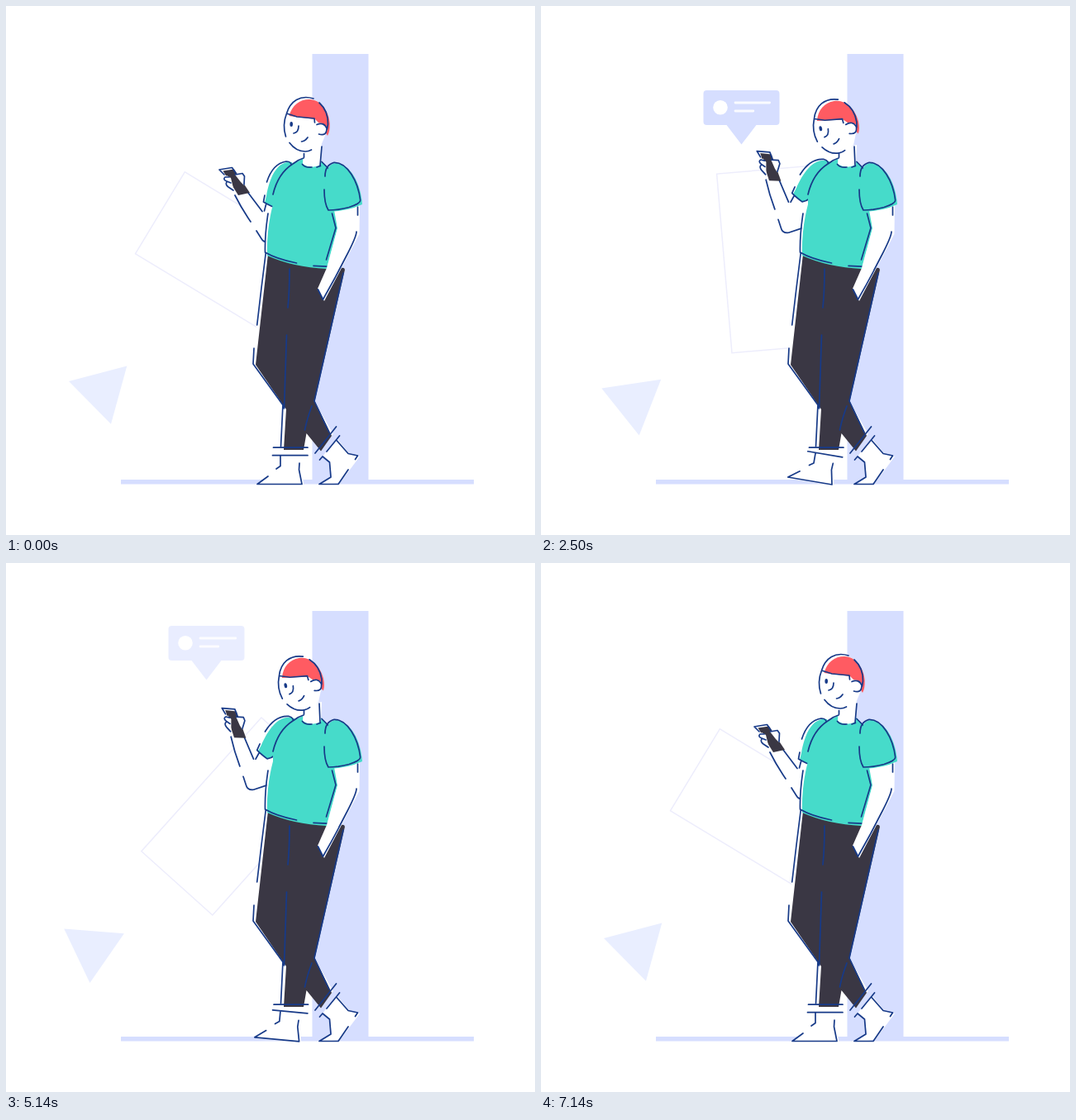
Animation of 640 by 640 pixels, one loop 7210 ms. Source, as an HTML page:

```html
<!DOCTYPE html>
<html lang="en">
<head>
<meta charset="utf-8">
<title>Person with a phone</title>
<style>
  html, body { margin: 0; width: 100%; height: 100%; overflow: hidden; background: #fff; }
  svg { display: block; width: 100%; height: 100%; }
  .line { fill: none; stroke: #173a88; stroke-width: 1.7; stroke-linecap: round; stroke-linejoin: round; }
  .pale { fill: #d6deff; }
  .teal { fill: #46dbca; }
  .dark { fill: #3a3744; }
  .red { fill: #ff5b62; }
  .white { fill: #fff; }
  .text { stroke: #fff; stroke-width: 2.8; stroke-linecap: round; stroke-opacity: .88; }
</style>
</head>
<body>
<svg viewBox="0 0 640 640">
  <rect id="frame" x="170.7" y="248.7" width="217.4" height="115.6" fill="none" stroke="#ededfc" stroke-width="1.5"/>
  <path class="pale" d="M370.5 58H438.5V573H566V578.5H139V573H370.5Z"/>
  <path id="triangle" fill="#e9eeff" d="M76 454L146.3 435.5L127 505.8Z"/>

  <g id="bubble">
    <path class="pale" d="M200.5 102H284.5Q288.5 102 288.5 106V140Q288.5 144 284.5 144H260.5L242.5 167.5L224.5 144H200.5Q196.5 144 196.5 140V106Q196.5 102 200.5 102Z"/>
    <circle id="avatar" class="white" cx="217" cy="122.8" r="8.8"/>
    <path id="text1" class="text"/>
    <path id="text2" class="text"/>
  </g>

  <g id="arm">
    <path class="white" d="M268 204L288 203L290 218L311 249L316 238L336 240L334 276L319 285Q312 287 309 282L296 261L277 229L264 211Z"/>
    <path class="teal" d="M346 189C328 187 319 207 315 230L313 238L326 244.5L335 238L352 205Z"/>
    <path class="line" d="M345.500 195Q346 188 339 188C326 190 319 202 315.500 213M313 229L311.500 237Q316 240 326 244.300Q331 242 334 238M314.600 240L312.500 248M293 226L310 248.500M277 229Q285 245 296 261M303 272L309 281.500Q312 287 319 284.500L334 275"/>
    <path class="white" d="M258 198L274 195.500L279 203L263 204Z"/>
    <path class="dark" d="M262.500 199.500L276 197.500L295 226L281 229Z"/>
    <path class="white" d="M277 204L287 202.500L289 206L288 217L284 213Z"/>
    <path class="white" d="M267 205L263 209L267 213L266 216L276 224L272 208Z"/>
    <path class="line" d="M264 204L258 198L273.500 195.500L278 202M277.500 204L286 202.500L288.500 206L288 216M270 207L265 207Q262 210 267 212L272 214M267 213Q265 216 269 219L275 223"/>
  </g>

  <g id="foot">
    <path class="white" d="M332 543H357L357 560L360.500 579.500H305L318 568L332 558Z"/>
    <path class="line" d="M322.500 543.700H365M332 544V556.500L327 560M317 569L304 578.500H358L354.500 561L355 553"/>
  </g>
  <path class="white" d="M314 297L300 414L299 433L336 485L332.500 534H362L364 518L376 532L396 518L373 478L410 318Z"/>
  <path class="dark" d="M317 300L390 315L409 317L410 319L373.500 478L394 520L381 538.500L363.500 517L360 537H336L339 488L302 434Z"/>
  <path class="line" d="M315 293Q309 340 303.700 386M300 414L299 433L337 485.500M335 482L332.500 533M343 318Q343 345 341 365M339.500 398Q338 445 336.500 487M408 323L373 478L391 516M370 484Q364 500 361.500 513"/>
  <path id="cuff" class="line" d="M323.500 534.200H365"/>

  <path class="white" d="M386 541L400 523L415 541L428 545L404 577L381 579.500L394 570L392 553L383 545Z"/>
  <path class="line" d="M374 541L399.500 509M388 539L403.500 520M379.500 549L383 545L391.500 552L393 570L379 578.500H402L414 561M399.500 525L414 541.500L425.500 544L422.500 548.500"/>

  <path class="white" d="M317 251L313 298L325 303L325 240Z"/>
  <path class="teal" d="M323 229C327 210 336 197 347 191L359 185L381 187L390 196L399 250L401 269L388 318Q347 316 316 302Q315 270 323 240Z"/>
  <path class="white" d="M360 172L382 168L381 192Q369 198 359 191Z"/>
  <path class="line" d="M323 228C327 211 336 198 347 191Q353 186 360 184M360.500 178.500L360.500 183M358.500 191.500Q362 196 370 195M376 195L380.500 193.500M382 188.500L391 197.500M317 251Q313 277 313.500 298Q327 306 351.500 311M372 314.300L388 315.200"/>
  <path id="nape" class="line"/>

  <path class="white" d="M397 247L428 240L427.500 276L385 357L377 342L388 317L401 269Z"/>
  <path class="line" d="M425.500 243V253M424 273Q424 279 412 302Q399 328 383.500 355L377.500 343M394.500 251L399 268.500L387.500 307"/>
  <path class="teal" d="M387 206Q389 190 400 190C418 193 429 215 431 240Q414 248 391 249Q384 231 387 206Z"/>
  <path class="line" d="M386 206Q386 192 397 189.300C413 189 426 212 428.700 235Q429 239 415 243.500Q402 247 390 247Q385 239 385 222"/>

  <g id="head">
    <path class="white" d="M340 131C345 116 353 111 366 112C381 113 390 127 390 147L381 169Q370 178 360 176C345 174 337 157 338 143Z"/>
    <path class="red" d="M342.500 133C346 120 355 113 367 113C381 113 391 128 391.700 142Q392 152 389 157L381 144L374 137Z"/>
    <path class="white" d="M374 143Q382 139 388 146Q390 154 382 157Q377 157 374 150Z"/>
    <path class="line" d="M372 112C356 107 344 115 339.500 130Q334 144 338.500 158M343 165.500Q351 176 362 176Q366 176 369.500 174M379 117Q390 127 389.500 143L388.500 149M339.500 130L352 134L373 136L373.500 141M376 143.500Q385 140 388 148Q388 158 378.500 155M354 145Q354 153 348 154M357.500 164Q362 163.500 365 159"/>
    <ellipse cx="345.200" cy="143" rx="1.800" ry="3" fill="#173a88"/>
  </g>
</svg>
<script>
const LOOP = 7210, FPS = 14;
const el = id => document.getElementById(id);
const clamp = x => Math.min(1, Math.max(0, x));
const turn = (id, deg, x, y) => el(id).setAttribute('transform', `rotate(${deg} ${x} ${y})`);

// Eased 0..1 between two times in ms.
function ease(t, from, to) {
  const u = clamp((t - from) / (to - from));
  return u * u * (3 - 2 * u);
}

// Foot tap phase in degrees at given times.
const TAPS = [[0, 0], [1430, 298], [2500, 517], [4210, 854], [5140, 985], [6140, 1155], [7140, 1440]];
function tapPhase(t) {
  const i = Math.max(1, TAPS.findIndex(k => t <= k[0]));
  const [t0, p0] = TAPS[i - 1], [t1, p1] = TAPS[i];
  return p0 + (p1 - p0) * (t - t0) / (t1 - t0);
}

function textLine(id, y, length, amount) {
  el(id).setAttribute('d', amount > 0 ? `M235 ${y}h${length * amount}` : '');
}

function draw(time) {
  const step = Math.floor(time * FPS / 1000 + 0.07);
  const t = Math.min(step * 1000 / FPS, 7140);
  const spin = 360 * t / 7140;

  turn('frame', 31.2 - spin, 279.4, 306.5);
  turn('triangle', spin, 111.15, 470.5);

  turn('arm', 14 * (ease(t, 380, 1100) - ease(t, 5500, 6480)), 351, 200);
  const nod = ease(t, 800, 1430) - ease(t, 5900, 6900);
  turn('head', -10 * nod, 372, 185);
  el('nape').setAttribute('d', `M${382 - 3 * nod} 170L380 193`);

  const tilt = 5 * (1 - Math.cos(tapPhase(t) * Math.PI / 180));
  turn('foot', tilt, 352, 543);
  el('cuff').setAttribute('transform', `translate(${tilt * 0.1} 0)`);

  const rise = 39 * (1 - ease(t, 300, 1000) - ease(t, 4720, 5410));
  const bubble = el('bubble');
  bubble.setAttribute('transform', `translate(0 ${rise})`);
  bubble.setAttribute('opacity', ease(t, 300, 1000) - ease(t, 4780, 5530));
  el('avatar').setAttribute('r', 8.8 * ease(t, 900, 1400));
  textLine('text1', 117, 42.8, ease(t, 1600, 2600));
  textLine('text2', 127, 21.8, ease(t, 1600, 2450));
}

const start = performance.now();
function tick() {
  draw((performance.now() - start) % LOOP);
  requestAnimationFrame(tick);
}
tick();
</script>
</body>
</html>
```
